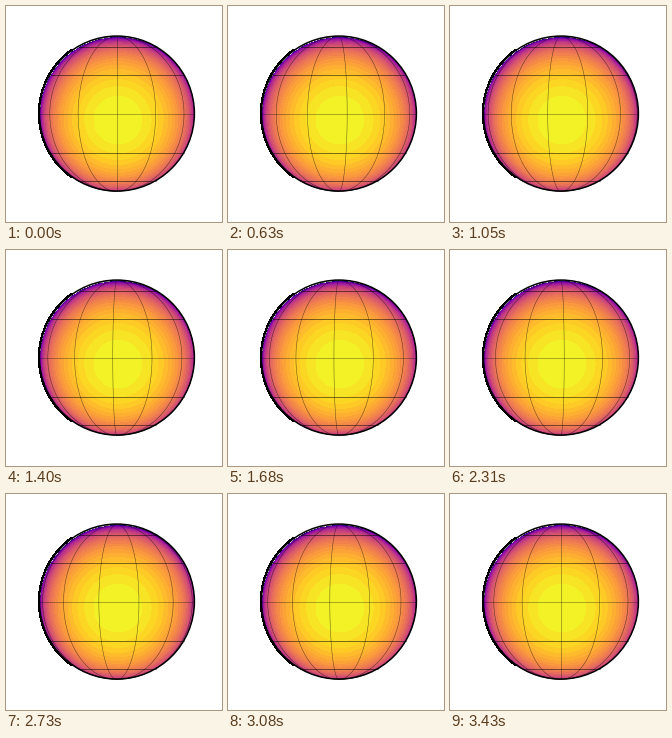
These frames come from a looping animation (216x216 px, 3500 ms). A matplotlib script:

```python
import numpy as np
import matplotlib.pyplot as plt
from matplotlib.animation import FuncAnimation
from matplotlib.collections import LineCollection
from matplotlib.patches import Arc, Circle

SIZE, DPI = 216, 72
FRAMES, INTERVAL = 50, 70
CX, CY, R = 110.9, 107.95, 77.5
MAP_SHIFT = 1.0  # the heat map sits slightly right of and below the outline
SUN_LAT = np.radians(-4)

fig = plt.figure(figsize=(SIZE / DPI, SIZE / DPI), dpi=DPI, facecolor="white")
ax = fig.add_axes([0, 0, 1, 1])
ax.set(xlim=(0, SIZE), ylim=(SIZE, 0))
ax.axis("off")

outline = Circle((CX, CY - 0.4), R, fc="none", ec="black", lw=1.5, zorder=5)
ax.add_patch(outline)

# coarse, stepped edge on the western limb
ax.add_patch(Arc((CX, CY - 0.4), 2 * R + 1.2, 2 * R + 1.2, theta1=125,
                 theta2=235, color="black", lw=1, antialiased=False, zorder=5))


def heat_map():
    """Day-side heating on the visible hemisphere, hottest under the sun."""
    u = np.linspace(-1, 1, 400)
    x, y = np.meshgrid(u, -u)
    z = np.sqrt(np.clip(1 - x**2 - y**2, 0, None))
    cos_sun = y * np.sin(SUN_LAT) + z * np.cos(SUN_LAT)
    heat = np.clip(cos_sun, 0, 1) ** 0.66
    heat = np.ma.masked_where(x**2 + y**2 > 1, heat)
    return CX + MAP_SHIFT + R * x, CY + MAP_SHIFT - R * y, heat


filled = ax.contourf(*heat_map(), levels=np.linspace(0, 1, 32), cmap="plasma",
                     vmin=0, vmax=1, antialiased=False)
filled.set_clip_path(outline)

for lat in range(-60, 61, 30):
    y = CY - R * np.sin(np.radians(lat))
    half = R * np.cos(np.radians(lat))
    ax.plot([CX - half, CX + half], [y, y], color="black", lw=0.5, zorder=3,
            alpha=1 if lat else 0.6)

meridians = LineCollection([], colors="black", linewidths=0.5, alpha=0.6,
                           zorder=3)
ax.add_collection(meridians)
lats = np.radians(np.linspace(-90, 90, 91))


def meridian(lon):
    x = CX + R * np.cos(lats) * np.sin(np.radians(lon))
    return np.column_stack([x, CY - R * np.sin(lats)])


def update(frame):
    turn = 360 * frame / (FRAMES - 1)
    lons = np.arange(-90, 90, 30) + turn % 30
    meridians.set_segments([meridian(lon) for lon in lons])
    return [meridians]


anim = FuncAnimation(fig, update, frames=FRAMES, interval=INTERVAL,
                     repeat=True, repeat_delay=0)
plt.show()
```
